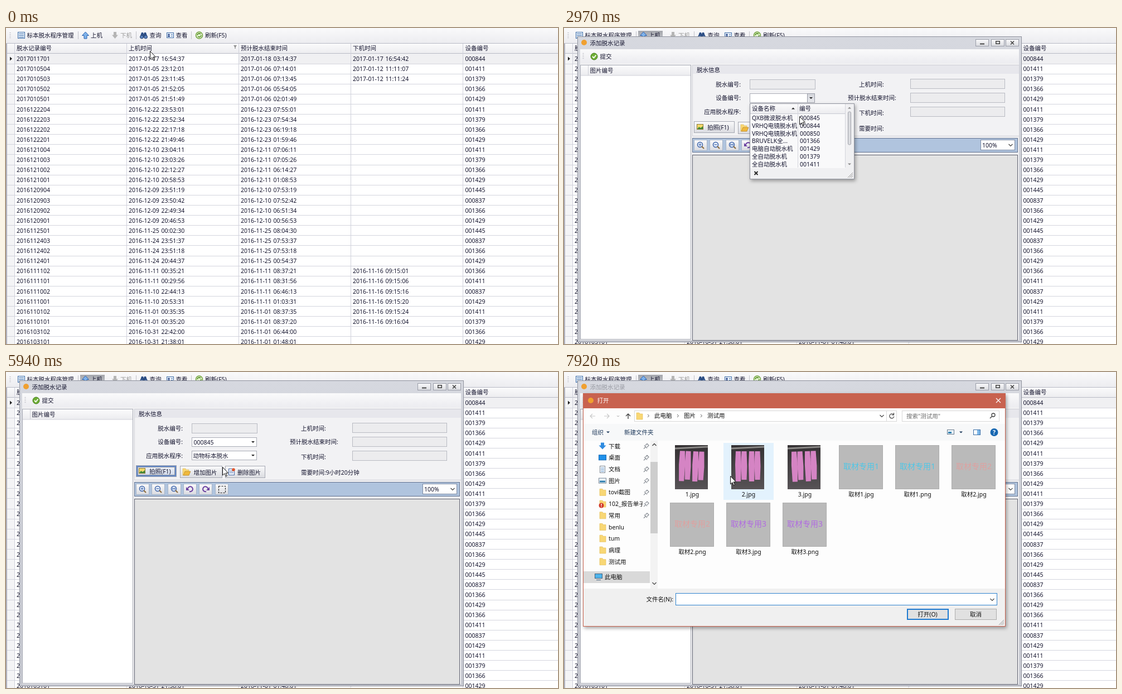
An HTML page that plays this animation: 990x566 px, repeating every 8 s.

```html
<!DOCTYPE html>
<html lang="zh-CN">
<head>
<meta charset="utf-8">
<style>
html, body { margin: 0; width: 100%; height: 100%; overflow: hidden; }
svg { display: block; font: 10.5px "Noto Sans", "Noto Sans CJK SC", "Noto Sans CJK", sans-serif; word-spacing: 1px; fill: #14142e; }
text { white-space: pre; }
</style>
</head>
<body>
<svg id="stage" width="990" height="566" viewBox="0 0 990 566"></svg>
<script>
const LOOP = 8000, STEP = 330;

// Drawing helpers; text is placed by its vertical centre.
const box = (x, y, w, h, fill, stroke, sw = 1) => stroke
  ? `<rect x="${x + sw / 2}" y="${y + sw / 2}" width="${w - sw}" height="${h - sw}" fill="${fill}" stroke="${stroke}" stroke-width="${sw}"/>`
  : `<rect x="${x}" y="${y}" width="${w}" height="${h}" fill="${fill}"/>`;
const text = (x, cy, s, attrs = '') => `<text x="${x}" y="${Math.round(cy + 4)}" ${attrs}>${s}</text>`;
const line = (d, stroke, w = 1, attrs = '') => `<path d="${d}" fill="none" stroke="${stroke}" stroke-width="${w}" ${attrs}/>`;
const shape = (d, fill, attrs = '') => `<path d="${d}" fill="${fill}" ${attrs}/>`;
const dot = (x, y, r, fill, attrs = '') => `<circle cx="${x}" cy="${y}" r="${r}" fill="${fill}" ${attrs}/>`;
const show = (from, to, s) => `<g class="timed" data-from="${from}" data-to="${to}">${s}</g>`;
const each = (list, fn) => list.map(fn).join('');
const gradient = (id, a, b) => `<linearGradient id="${id}" x2="0" y2="1"><stop stop-color="${a}"/><stop offset="1" stop-color="${b}"/></linearGradient>`;
const down = (x, y, c = '#222', r = 3) => shape(`M${x - r} ${y - r / 2}h${2 * r}l${-r} ${r}z`, c);
const up = (x, y, c = '#222', r = 3) => shape(`M${x - r} ${y + r / 2}h${2 * r}l${-r} ${-r}z`, c);
const chevron = (x, y, c = '#444') => line(`M${x - 3.5} ${y - 2}l3.5 3.5 3.5-3.5`, c, 1.2);
const END = 'text-anchor="end"', MID = 'text-anchor="middle"', GREY = 'fill="#999"';
const dotted = (x, y, w, h) => line(`M${x + .5} ${y + .5}h${w}v${h}h${-w}z`, '#555', 1, 'stroke-dasharray="1 1"');
const grip = (x, y) => line(`M${x - 9} ${y}l9-9M${x - 6} ${y}l6-6M${x - 3} ${y}l3-3`, '#999');

// Record table: each line is a day followed by "time device" pairs.
const days = `2017-01-17 16:54:37 0844
2017-01-05 23:12:01 1411 23:11:45 1379 21:52:05 1366 21:51:49 1429
2016-12-22 23:53:01 1411 23:52:34 1379 22:17:18 1366 21:49:46 1429
2016-12-10 23:04:11 1411 23:03:26 1379 22:12:27 1366 20:58:53 1429
2016-12-09 23:51:19 1445 23:50:42 0837 22:49:34 1366 20:46:53 1429
2016-11-25 00:02:30 1445
2016-11-24 23:51:37 0837 23:51:18 1366 20:44:37 1429
2016-11-11 00:35:21 1366 00:29:56 1411
2016-11-10 22:44:13 0837 20:53:31 1429
2016-11-01 00:35:35 1411 00:35:20 1379
2016-10-31 22:42:00 1366 21:38:01 1429`;
const minutes = { '0844': 620, 1429: 250 };
const removed = { 0: '2017-01-17 16:54:42', 1: '2017-01-12 11:11:07', 2: '2017-01-12 11:11:24' };
['15:01', '15:06', '15:16', '15:20', '15:24', '16:04'].forEach((t, i) => removed[21 + i] = '2016-11-16 09:' + t);

const rows = days.split('\n').flatMap(entry => {
  const [day, ...cells] = entry.split(' '), count = cells.length / 2;
  return Array.from({ length: count }, (_, i) => {
    const time = cells[2 * i], device = cells[2 * i + 1];
    const end = new Date(Date.parse(`${day}T${time}Z`) + (minutes[device] || 482) * 60000);
    return [day.replace(/-/g, '') + '0' + (count - i), `${day} ${time}`,
      end.toISOString().slice(0, 19).replace('T', ' '), '', '00' + device];
  });
});
rows.forEach((row, i) => row[3] = removed[i] || '');

const columns = [19, 220, 421, 622, 823.5];
const arrowUp = 'M142.500 7l6 6.500h-3.500v5.500h-5v-5.500h-3.500z';

function mainWindow() {
  const rowHeight = 18.11;
  let s = box(0, 0, 990, 566, '#fff') + box(0, 0, 990, 27, 'url(#bar)')
    + line('M7.500 8v12', '#b5b5bd', 2, 'stroke-dasharray="1 2"')
    + box(21, 7, 13, 12, '#e6f0fb', '#3f6ea8') + line('M23 10.500h9M23 13.500h9M23 16.500h9', '#3f6ea8')
    + text(37.5, 13, '标本脱水程序管理')
    + line('M129.500 6v14M233.500 6v14M332.500 6v14', '#c2c2ca')
    + show(5, 99, box(133, 5, 44, 16, 'url(#pressed)'))
    + shape(arrowUp, '#7fb2ea', 'stroke="#2b62b0"') + text(152, 13, '上机')
    + shape('M195.500 19l-5.500-6.500h3v-5.500h5v5.500h3z', '#b5b5b5') + text(205, 13, '下机', GREY)
    + shape('M240 17l3-9h3l1 3 1-3h3l3 9z', '#2d4f86') + dot(243.5, 16, 3, '#5b82bd', 'stroke="#23406f"') + dot(250.5, 16, 3, '#5b82bd', 'stroke="#23406f"')
    + text(257.5, 13, '查询')
    + box(288, 8, 13, 10, '#eef4fc', '#3f6ea8') + dot(292, 12, 1.8, '#2f4f90') + box(290, 14, 4, 2, '#2f4f90') + line('M296 11.500h3M296 14.500h3', '#3f6ea8')
    + text(304.5, 13, '查看')
    + dot(346.5, 13, 6, '#e3f2cf', 'stroke="#6fa03a" stroke-width="1.500"') + line('M343 13a3.500 3.500 0 0 1 6-2M350 13a3.500 3.500 0 0 1-6 2', '#4d8c1c', 1.6)
    + text(357, 13, '刷新(F5)')
    + box(0, 27, 990, 19, 'url(#head)') + line('M0 27.500h990M0 45.500h990', '#b9bbc6')
    + box(2, 46, 13, 520, '#f4f4f6') + box(15, 46, 975, 18, '#f0f0f2') + box(217, 46, 200, 18, '#fff')
    + each(['脱水记录编号', '上机时间', '预计脱水结束时间', '下机时间', '设备编号'], (t, i) => text(columns[i], 36, t));
  rows.forEach((row, i) => {
    const y = 55 + i * rowHeight, bottom = Math.round(63.5 + i * rowHeight) + .5;
    s += each(row, (t, c) => text(columns[c], y, t)) + line(`M2 ${bottom}h988`, '#d4d5de');
  });
  return s + line('M15.500 28v538M216.500 28v538M417.500 28v538M618.500 28v538M819.500 28v538', '#d0d1db')
    + line('M1 28v538', '#aeb0bd', 2) + shape('M7 51.500l4 3.500-4 3.500z', '#222')
    + show(0, 0, shape('M408 31h6l-2.300 3v3h-1.400v-3z', '#888'));
}

const input = (x, y, w, h) => box(x, y, w, h, '#ececee', '#b9bbc3');
const combo = y => box(333, y, 117, 17, '#fff', '#a9acb6') + down(443, y + 8.5);
const hotArrow = y => box(436, y, 14, 17, 'url(#hot)', '#9a9da8') + down(443, y + 8.5);
const button = (x, y, w, h) => box(x, y, w, h, 'url(#button)', '#a6a9b3');
const picture = (x, y) => box(x, y, 12, 10, '#f5d86a', '#8c7a35') + shape(`M${x + 1} ${y + 9}l3-4 3 2 4-3v5z`, '#3f8a3a');
const folder = (x, y) => shape(`M${x} ${y}h5l1 2h5v10h-11z`, '#f8d775', 'stroke="#e3b94e" stroke-width=".6"');
const lens = (x, mark) => dot(x - 1, 209, 4.5, '#eaf2fd', 'stroke="#3c62a8" stroke-width="1.500"') + line(`M${x + 2} 212l4 4`, '#8a6a3a', 2) + line(mark, '#3c62a8', 1.2);

function recordDialog() {
  const centers = [245, 273, 302, 330, 358, 387];
  const focus = box(234, 168, 71, 19, 'url(#focus)', '#5f86c8', 2), focusDots = dotted(236, 170, 66, 14);
  return box(24, 15, 797, 548, 'url(#frame)', '#8f929d')
    + dot(36, 26, 5, '#f0a030')
    + show(0, 21, text(46.5, 27, '添加脱水记录')) + show(22, 99, text(46.5, 27, '添加脱水记录', 'fill="#999ba3"'))
    + each([738, 766, 792], x => box(x, 20, 24, 13, 'url(#button)', '#9a9da8'))
    + line('M746 28.500h8', '#444', 2) + box(774, 23, 8, 6, 'none', '#444', 1.5) + line('M801 23.500l6 6m0-6l-6 6', '#444', 1.6)
    + box(29, 38, 787, 521, '#f0f0f2') + box(29, 38, 787, 25, 'url(#bar)')
    + line('M34.500 45v12', '#b5b5bd', 2, 'stroke-dasharray="1 2"')
    + dot(54, 51, 6, '#6fae35', 'stroke="#3f7a18"') + line('M51 51l2.500 2.500 4-5', '#fff', 1.8) + text(64.5, 51, '提交')
    + box(29, 66, 199, 492, '#fff', '#a9acb6') + box(30, 67, 197, 18, 'url(#head)') + line('M30 85h197M43.500 67v18', '#cfd0d8')
    + text(46.5, 76, '图片编号')
    + box(230, 66, 587, 128, '#f2f2f4', '#d0d1d8') + box(231, 67, 585, 15, '#e7e7ec') + text(238, 75, '脱水信息')
    + text(317, 101, '脱水编号:', END) + text(317, 125, '设备编号:', END) + text(317, 150, '应用脱水程序:', END)
    + text(529, 101, '上机时间:') + text(509, 125, '预计脱水结束时间:') + text(529, 152, '下机时间:')
    + text(529, 180, '需要时间:<tspan class="timed" data-from="15" data-to="99">9小时20分钟</tspan>')
    + input(333, 92, 118, 18) + each([91, 116, 141], y => input(621, y, 170, 18))
    + combo(117) + combo(141)
    + show(8, 11, hotArrow(117)) + show(12, 14, hotArrow(141))
    + show(10, 99, text(336.5, 126, '000845')) + show(10, 11, dotted(335, 119, 100, 12))
    + show(0, 14, text(336.5, 150, '[无数据]')) + show(15, 99, text(335.5, 150, '动物标本脱水')) + show(15, 16, dotted(335, 143, 100, 12))
    + button(233, 167, 73, 21)
    + show(0, 8, focus + focusDots) + show(16, 99, focus) + show(17, 99, focusDots)
    + picture(238, 172) + text(257, 178, '拍照(F1)')
    + button(312, 168, 76, 22) + folder(317, 173) + shape('M318 185l3-7h10l-3 7z', '#f0b93c', 'stroke="#a87820" stroke-width=".6"') + text(336.5, 180, '增加图片')
    + button(393, 168, 72, 22) + box(399, 173, 11, 12, '#f4f7fc', '#4a6ba8') + line('M401 177.500h7M401 180.500h7', '#4a6ba8') + dot(408, 175, 2.8, '#e0562d') + text(415, 180, '删除图片')
    + box(230, 197, 584, 26, '#b0c4de', '#64738f')
    + each(centers, x => box(x - 12, 200, 24, 20, 'url(#button)', '#a6b4c8'))
    + lens(245, 'M241.500 209h5m-2.500-2.500v5') + lens(273, 'M269.500 209h5') + lens(302, 'M299 207v4m4-4v4m-2-3v2')
    + line('M326 209a4.500 4.500 0 1 1 3 5', '#6a3fa0', 2) + shape('M323 206v6h6z', '#6a3fa0')
    + line('M362 209a4.500 4.500 0 1 0-3 5', '#6a3fa0', 2) + shape('M365 206v6h-6z', '#6a3fa0')
    + line('M381.500 204.500h12v12h-12z', '#222', 1.2, 'stroke-dasharray="3 2"')
    + box(747, 200, 62, 19, '#fff', '#7c8aa3') + text(750, 210, '100%') + chevron(801, 210)
    + box(230, 227, 584, 333, '#e3e3e3', '#5f6270');
}

function popup(y, height, first, thumb, names, extra) {
  const bottom = y + height;
  return `<g filter="url(#shadow)">${box(333, y, 188, height, '#f9f9fa', '#8f929d')}</g>`
    + box(334, y + 1, 171, 17, 'url(#head)') + line(`M334 ${y + 18.5}h171`, '#c8cad2')
    + box(505, y + 1, 15, height - 21, '#f0f0f2') + up(512, y + 8, '#888') + down(512, bottom - 27, '#888')
    + `<rect x="509.500" y="${y + 15}" width="5" height="${thumb}" rx="2" fill="#d9dade" stroke="#a2a4ac"/>`
    + box(334, bottom - 20, 186, 19, '#f0f0f2') + grip(518, bottom - 3)
    + line(`M341.500 ${bottom - 14}l6 6m0-6l-6 6`, '#222', 1.8)
    + extra + each(names, (name, i) => text(337, first + i * 13.83, name));
}

function devicePopup() {
  const names = ['QXB微波脱水机', 'VRHQ电镜脱水机', 'VRHQ电镜脱水机', 'BRUVELK全...', '电脑自动脱水机', '全自动脱水机', '全自动脱水机'];
  const codes = ['0845', '0844', '0850', '1366', '1429', '1379', '1411'];
  return popup(135, 136, 161, 59, names, text(337, 144, '设备名称') + up(411, 144) + text(422, 144, '编号')
    + line('M419.500 136v114M504.500 136v114', '#d4d5dc')
    + each(codes, (code, i) => text(423, 161 + i * 13.83, '00' + code)));
}

function programPopup() {
  const names = ['大标本脱水', '动物标本脱水', '肾、肝标本脱水', '骨髓标本脱水', '常规特快速脱水', '小标本脱水', '常规标本脱水'];
  const marked = y => box(334, y, 171, 14, '#ebebee', '#dcdde2');
  return popup(158, 136, 184.5, 73, names, text(337, 168, '程序')
    + line('M504.500 159v114', '#d4d5dc') + show(13, 13, marked(177)) + show(14, 14, marked(191)));
}

// A dark tray with two pairs of pink slabs, slightly tilted.
const photo = (x, y, tilt) => box(x, y, 59, 79, 'url(#photo)')
  + line(`M${x} ${y + 6}l59-3`, '#8a8886', 3)
  + `<g transform="rotate(${tilt} ${x + 30} ${y + 39})">`
  + each([8, 18.5, 32, 42.5], (dx, n) => shape(`M${x + dx} ${y + 11}h9l1 27-1 ${27 - n % 2 * 3}h-9l-1-30z`, '#d584c4')) + '</g>';

function fileDialog() {
  const places = ['下载', '桌面', '文档', '图片', 'tovi截图', '102_报告单子', '常用', 'benlu', 'tum', '病理', '测试用'];
  const files = ['1.jpg', '2.jpg', '3.jpg', '取材1.jpg', '取材1.png', '取材2.jpg', '取材2.png', '取材3.jpg', '取材3.png'];
  const inks = { 1: '#4fc6e6', 2: '#dfa09f', 3: '#b06be0' };
  const icons = [
    y => shape(`M66 ${y - 6}h6v5h3.500l-6.500 7-6.500-7h3.500z`, '#2f8be0'),
    y => box(62, y - 5, 14, 10, '#1e90ea', '#1569b4'),
    y => box(64, y - 6, 10, 13, '#fff', '#7b8794') + line(`M66 ${y - 2}h6m-6 3h6m-6 3h6`, '#4b86c5'),
    y => box(62, y - 5, 14, 10, '#eaf4fc', '#7b8794') + box(64, y, 10, 3, '#2f7fae')];
  const cell = i => box(286 + (i - 1) * 101, 127, 90, 102, '#e3f2fd');
  return `<g filter="url(#shadow)">${box(34, 38, 758, 418, '#fdfdfd', '#c8624f')}</g>`
    + box(34, 38, 758, 27, '#c8624f') + dot(48, 51, 5, '#f0a030') + text(59.5, 51, '打开', 'fill="#fff"')
    + line('M775 47l8 8m0-8l-8 8', '#fff', 1.2)
    + line('M56 79h-9m4-4l-4 4 4 4M72 79h9m-4-4l4 4-4 4', '#c8c8c8', 1.2) + line('M95 78l2 2 2-2', '#aaa')
    + line('M115 84v-9m-4 4l4-4 4 4', '#444', 1.4)
    + box(126, 69, 471, 20, '#fff', '#d9d9d9') + line('M578.500 70v18', '#d9d9d9') + folder(130, 73)
    + each([151, 204, 246], x => line(`M${x - 1} 76l2.500 2.500-2.500 2.500`, '#555'))
    + text(162, 78, '此电脑') + text(215, 78, '图片') + text(257, 78, '测试用')
    + chevron(570, 79) + line('M591 76.500a4 4 0 1 0 .8 3M591.500 73v4h-4', '#444', 1.2)
    + box(606, 69, 175, 20, '#fff', '#d9d9d9') + text(614, 79, '搜索"测试用"', 'fill="#6d6d6d"')
    + dot(770, 77, 3, 'none', 'stroke="#444" stroke-width="1.300"') + line('M768 79l-4 4', '#444', 1.5)
    + box(35, 93, 756, 30, '#f7f8f9') + text(50, 108, '组织', 'fill="#1e395b"') + down(79, 108, '#1e395b') + text(108, 108, '新建文件夹', 'fill="#1e395b"')
    + box(687, 103, 13, 9, '#eaf4fc', '#6c7c8e') + box(689, 107, 6, 3, '#2f7fae') + down(712, 108, '#1e395b')
    + box(734, 103, 13, 10, '#fff', '#3a6ea5') + box(741, 104, 5, 8, '#7db7e8')
    + dot(771.5, 108, 7, '#1767b1') + text(771.5, 108, '?', MID + ' fill="#fff" font-weight="bold"')
    + box(35, 357, 119, 21, '#d9d9d9') + box(55, 361, 14, 9, '#4fb4ec', '#44637e') + line('M58 372.500h8', '#44637e') + text(73, 367, '此电脑')
    + each(places, (name, i) => {
      const y = 132.5 + i * 20.72;
      return (icons[i] ? icons[i](y) : folder(64, y - 6)) + text(80, y, name)
        + (i < 7 ? box(141, y - 7, 13, 14, '#fdfdfd') + line(`M143 ${y + 5}l4-4m-3-2l5 5m-3-5l3-3 3 3-3 3`, '#8a8f96', 1.3) : '');
    })
    + dot(67, 239, 4.5, '#d23a2a') + line('M67 236v3.500m0 1v1.300', '#fff', 1.4)
    + box(155, 123, 13, 265, '#f3f3f3') + box(155, 161, 13, 128, '#cdcdcd')
    + line('M158.500 132l3.500-3.500 3.500 3.500', '#444', 1.4) + chevron(162, 379)
    + show(22, 23, cell(2)) + show(24, 99, cell(1))
    + each(files, (name, i) => {
      const cx = 230 + i % 6 * 101, y = i < 6 ? 131 : 234;
      const digit = name[2];
      return (i < 3 ? photo(cx - 31, y, 2 - 2 * i) : box(cx - 40, y, 79, 79, '#bababa', '#adadad')
        + text(cx, y + 39, '取材专用' + digit, `${MID} fill="${inks[digit]}" font-size="14"`))
        + text(cx, i < 6 ? 219 : 322, name, MID);
    })
    + box(35, 388, 756, 67, '#f0f0f0')
    + text(196, 407, '文件名(N):', END) + box(200, 396, 577, 22, '#fff', '#2f83cf') + chevron(768, 408)
    + show(22, 23, line('M204.500 400v15', '#000'))
    + box(615, 424, 75, 20, '#e1e1e1', '#1f7ad0', 2) + text(652, 434, '打开(O)', MID)
    + box(701, 424, 75, 20, '#e1e1e1', '#adadad') + text(738.5, 434, '取消', MID)
    + grip(789, 453);
}

const stage = document.getElementById('stage');
stage.innerHTML = `<defs>
  ${gradient('bar', '#fafafb', '#ececf0')}${gradient('head', '#fbfbfc', '#ececef')}${gradient('frame', '#d6d8df', '#c6c8d0')}
  ${gradient('button', '#fafafb', '#dadbe0')}${gradient('focus', '#eef2f9', '#d0d9ea')}${gradient('hot', '#d2d4da', '#e9eaee')}
  ${gradient('pressed', '#a4a6ac', '#c4c6cc')}${gradient('photo', '#343133', '#575356')}
  <filter id="shadow" x="-10%" y="-10%" width="120%" height="125%"><feDropShadow dx="2" dy="3" stdDeviation="3" flood-opacity=".35"/></filter>
</defs>`
  + mainWindow() + show(5, 99, recordDialog())
  + show(9, 9, devicePopup()) + show(12, 14, programPopup())
  + show(22, 99, `<g id="files" fill="#111">${fileDialog()}</g>`)
  + `<path id="pointer" d="M.500 .500v14.500l3.400-3.200 2.500 5.200 2-1-2.400-5h4.500z" fill="#fff" stroke="#111"/>`;

// Pointer stops: step, x, y.
const stops = [[0, 258, 41], [1, 186, 25], [2, 173, 16], [3, 297, 68], [6, 403, 125], [7, 431, 135], [8, 438, 125],
  [9, 422, 158], [10, 419, 158], [11, 427, 166], [12, 440, 154], [13, 425, 189], [14, 419, 199],
  [15, 318, 188], [16, 280, 176], [17, 274, 176], [18, 388, 170], [24, 298, 186]];
const timed = [...stage.querySelectorAll('.timed')];
const files = document.getElementById('files'), pointer = document.getElementById('pointer');

function draw(now) {
  const step = Math.floor(now % LOOP / STEP);
  for (const part of timed) {
    const { from, to } = part.dataset;
    part.style.display = step >= +from && step <= +to ? '' : 'none';
  }
  const opening = step === 22;
  files.setAttribute('opacity', opening ? .75 : 1);
  files.setAttribute('transform', opening ? 'translate(413 247) scale(.985) translate(-413 -247)' : '');
  const [, x, y] = stops.findLast(stop => stop[0] <= step);
  pointer.setAttribute('transform', `translate(${x} ${y})`);
  requestAnimationFrame(draw);
}
requestAnimationFrame(draw);
</script>
</body>
</html>
```
